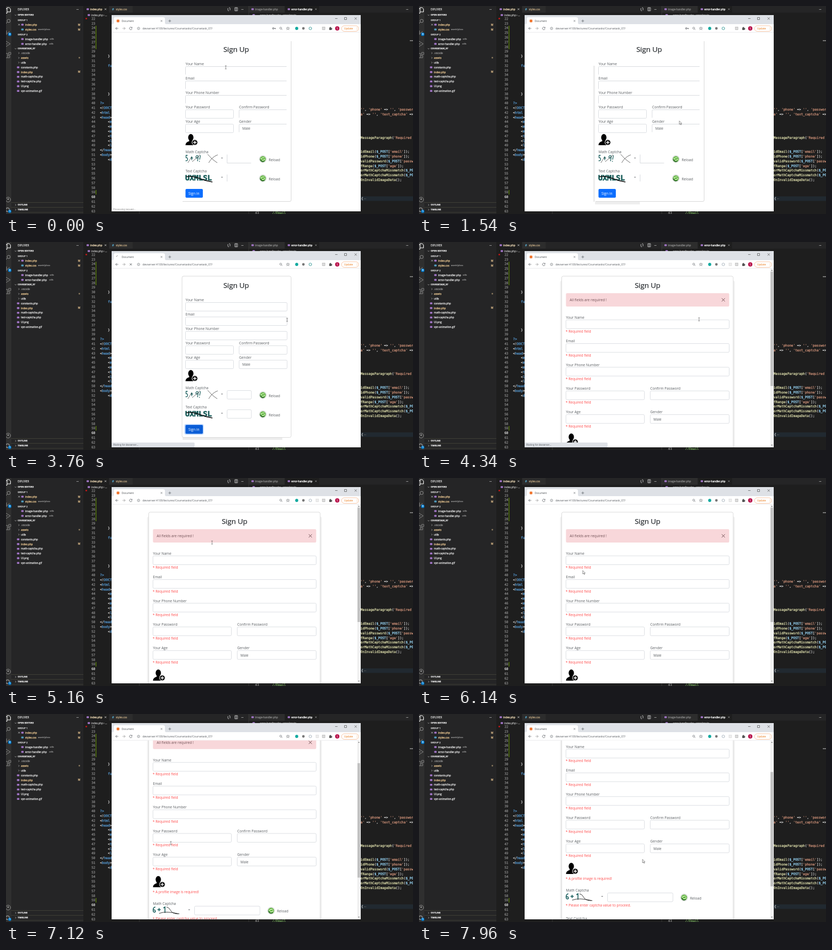
Animation of 763x390 px, one loop 8 s. Source, as an HTML page:

```html
<!DOCTYPE html>
<html lang="en">
<head>
<meta charset="utf-8">
<title>Sign Up</title>
<style>
html, body { margin: 0; width: 100%; height: 100%; overflow: hidden; background: #1e1e1e; }
svg { display: block; width: 100%; height: 100%; }
text { font-family: "Open Sans", "Noto Sans", sans-serif; white-space: pre; stroke-width: 0; }
.code { font-family: "DejaVu Sans Mono", "Noto Sans Mono", monospace; }
.strong text { stroke-width: 0.25px; }
.heavy { stroke-width: 0.7px; }
</style>
</head>
<body>
<svg id="stage" viewBox="0 0 763 390"></svg>
<script>
const LOOP = 8000, STEP = 139.7, LAG = 25;
const CHAR = 3.68, LINE = 8.8;

// Markup helpers; text is placed by its vertical middle.
const esc = s => s.replace(/&/g, '&amp;').replace(/</g, '&lt;');
const text = (x, y, s, size, fill, extra = '') =>
  `<text x="${x}" y="${y + size * 0.35}" font-size="${size}" fill="${fill}" stroke="${fill}" ${extra}>${esc(s)}</text>`;
const rect = (x, y, w, h, fill, extra = '') =>
  `<rect x="${x}" y="${y}" width="${w}" height="${h}" fill="${fill}" ${extra}/>`;
const dot = (x, y, r, fill, extra = '') => `<circle cx="${x}" cy="${y}" r="${r}" fill="${fill}" ${extra}/>`;
const line = (d, stroke, w = 0.7, extra = '') =>
  `<path d="${d}" fill="none" stroke="${stroke}" stroke-width="${w}" ${extra}/>`;
const group = (id, body, extra = '') => `<g id="${id}" ${extra}>${body}</g>`;
const cross = (x, y, r, color, w) => line(`M${x - r} ${y - r}l${2 * r} ${2 * r}m0 ${-2 * r}l${-2 * r} ${2 * r}`, color, w);
const fileIcon = (x, y, color = '#a074c4') => rect(x, y - 1.8, 4.6, 3.6, color, 'rx="1.2"');

function code(x, y, s) {
  const tokens = s.match(/'[^']*'?|\/\/.*|\$\w+|<\/?|\w+|[^\w'$<\/]+|./g);
  let html = '';
  tokens.forEach((t, i) => {
    const next = tokens[i + 1] || '';
    const color = t[0] === "'" ? '#ce9178'
      : t.startsWith('//') ? '#6a9955'
      : t[0] === '$' ? '#9cdcfe'
      : /^\w/.test(t) ? (next[0] === '(' ? '#dcdcaa' : '#569cd6')
      : t[0] === '?' ? '#569cd6' : '#d4d4d4';
    html += `<tspan fill="${color}" stroke="${color}">${esc(t)}</tspan>`;
  });
  return `<text class="code" x="${x}" y="${y + 2.1}" font-size="6.1">${html}</text>`;
}

function activityBar() {
  const gray = '#8f8f8f';
  return rect(0, 0, 10, 390, '#2f2f2f')
    + line('M-1 5H2V3H6L8.5 5.5V11H2V5M2 11V13.5H-1', '#fff', 1)
    + line('M-1 34L2.5 30', gray, 1) + dot(5, 28, 3, 'none', `stroke="${gray}"`)
    + line('M1 46V54M1 51Q6 51 6 47', gray, 0.9) + dot(7, 53, 3.2, '#007acc') + text(6, 53, '3', 4, '#fff')
    + line('M0 66L8 71L0 76M0 71H3', gray, 0.9)
    + line('M-1 89H3V97H-1M3 93H7V97H3M5 87H9V91H5Z', gray, 0.9)
    + dot(4, 363, 4.5, 'none', `stroke="${gray}"`) + dot(4, 362, 1.6, gray)
    + dot(3, 382, 3.5, 'none', `stroke="${gray}" stroke-width="1.5"`)
    + dot(7, 385, 3, '#007acc') + text(5.9, 385, '1', 4, '#fff');
}

function fileRow(x, y, name, opt = {}) {
  const color = opt.color || '#dcdcdc';
  return fileIcon(x - 7.5, y, opt.icon)
    + text(x, y, name, 4.8, color)
    + (opt.dir ? text(opt.dirX, y, opt.dir, 3.9, '#8a8a8a') : '')
    + (opt.mark ? text(135, y, opt.mark, 4.7, color) : '');
}

function sidebar() {
  const yellow = '#e2c08d', rule = '#46463a';
  const head = (x, y, s) => text(x, y, s, 4.15, '#e4e4e4', 'font-weight="700"');
  const chevron = (x, y, open) =>
    line(open ? `M${x - 1.5} ${y - 0.7}l1.5 1.5l1.5 -1.5` : `M${x - 0.7} ${y - 1.5}l1.5 1.5l-1.5 1.5`, '#ccc', 0.7);
  let s = rect(10, 0, 135, 390, '#252526')
    + text(22, 6, 'EXPLORER', 4.4, '#c4c4c4') + text(132, 6, '···', 5, '#ccc', 'font-weight="700"')
    + chevron(18, 17, true) + head(22, 17, 'OPEN EDITORS')
    + text(22, 26, 'GROUP 1', 4.3, '#dcdcdc') + cross(24.5, 35, 1.5, '#ccc', 0.8)
    + fileRow(36, 35, 'index.php', { color: yellow, mark: 'M' })
    + fileRow(36, 44, 'styles.css', { color: yellow, mark: 'M', icon: '#519aba', dir: 'assets\\js\\css', dirX: 60 })
    + text(22, 53, 'GROUP 2', 4.3, '#dcdcdc')
    + fileRow(36, 62, 'image-handler.php', { dir: 'utils', dirX: 82 })
    + fileRow(36, 71, 'error-handler.php', { dir: 'utils', dirX: 81 })
    + chevron(18, 80, true) + head(22, 80, 'COURSETASK_07');
  [['.vscode', '#8a8a8a'], ['assets', yellow], ['utils', '#dcdcdc']].forEach(([name, color], i) => {
    const y = 88.3 + i * 8.9;
    s += chevron(24, y, false) + text(28, y, name, 4.8, color);
  });
  s += dot(137.5, 97, 1.4, '#8f7e61');
  ['constants.php', 'index.php', 'math-captcha.php', 'text-captcha.php', 'UI.png', 'vpn-animation.gif']
    .forEach((name, i) => {
      s += fileRow(28, 115 + i * 8.85, name, i === 1 ? { color: yellow, mark: 'M' } : {});
    });
  ['OUTLINE', 'TIMELINE'].forEach((name, i) => {
    const y = 373 + i * 9;
    s += line(`M10 ${y - 4.5}H145`, rule, 0.8) + chevron(18, y, false) + head(22, y, name);
  });
  return s + line('M10 387H145', rule, 0.8);
}

function editors() {
  let s = rect(145, 0, 618, 390, '#1e1e1e') + rect(145, 0, 618, 12.5, '#252526')
    + rect(145, 0, 48, 12.5, '#1e1e1e') + rect(193.5, 0, 44, 12.5, '#2d2d2d')
    + rect(455, 0, 67, 12.5, '#2d2d2d') + rect(523, 0, 64, 12.5, '#1e1e1e')
    + fileIcon(151, 6) + text(158, 6, 'index.php', 4.85, '#f0dcb8') + cross(186.5, 6, 1.5, '#ddd', 0.8)
    + text(199, 6, '#', 5, '#519aba', 'font-weight="700"') + text(206, 6, 'styles.css', 4.8, '#b39c7a')
    + fileIcon(460, 6) + text(467, 6, 'image-handler.php', 4.8, '#858585')
    + fileIcon(528, 6) + text(535, 6, 'error-handler.php', 4.7, '#fff') + cross(581, 6, 1.5, '#999', 0.7)
    + fileIcon(153, 17) + text(160, 17, 'index.php › ...', 4.7, '#a9a9a9')
    + fileIcon(462, 17) + text(476, 17, 'error-handler.php › errorInputs', 4.7, '#999')
    + line('M416 4V8Q416 9 418 9M420 8V4Q420 3 418 3M429 3H434V9H429ZM431.5 3V9', '#ccc', 0.9)
    + text(441, 6, '···', 5, '#ccc', 'font-weight="700"') + text(750, 6, '···', 5, '#ccc', 'font-weight="700"')
    + line('M455 0V390M250 385V390', '#444', 0.6)
    + dot(150.5, 23.5, 1.6, '#c01818')
    + rect(168, 37, 1.4, 44, '#587c0c') + rect(168, 345, 1.4, 8.5, '#587c0c');

  const left = { 30: '    }', 32: '    fu', 38: '    }', 40: '?>', 41: '<!DOCT', 42: '<html', 43: '<head>',
    44: '    <m', 45: '    <m', 46: '    <m', 47: '    <t', 48: '    <l', 49: '    <l', 50: '</head>', 51: '<body>', 52: '    <d' };
  for (let n = 22; n <= 63; n++) {
    const y = 23.6 + (n - 22) * LINE;
    s += text(167.5, y, String(n), 6.1, n === 60 ? '#d6d6d6' : '#858585', 'class="code" text-anchor="end"');
    if (left[n]) s += code(176.3, y, left[n]);
  }

  const right = [
    [194, "'', 'phone' => '', 'password'"], [202.8, "'ta' => '', 'text_captcha' =>", 2],
    [246.5, "MessageParagraph('Required fi"], [273, "idEmail($_POST['email']);"], [281.8, "idPhone($_POST['phone']);"],
    [290.6, "validPassword($_POST['password"], [299.4, "fRange($_POST['age']);"],
    [308.2, "orMathCaptchaMissmatch($_POST"], [317, "orMathCaptchaMissmatch($_POST"], [325.8, 'OnInvalidImageData();']
  ];
  s += rect(455, 357, 308, 8.5, '#212930');
  for (const [y, row, cut = 0] of right) s += code(664.8 - cut * CHAR, y, row);
  return s + code(666, 361, '{') + text(671, 361, '···', 5, '#888') + line('M757 65H763', '#ccc', 1)
    + text(467, 387.5, '43', 6.1, '#858585', 'class="code"') + code(499, 387.5, '//Email');
}

function browserChrome() {
  const g = '#5f6368';
  return rect(198, 17, 467, 368, '#fff') + rect(198, 17, 467, 17, '#dee1e6')
    + '<path d="M199 34.5Q202 34 202 31V24Q202 21 205 21H294Q298 21 298 24V31Q298 34 301 34.5Z" fill="#fff"/>'
    + group('favicon', rect(207.5, 25.5, 5, 5, '#f0742c', 'rx="1"'))
    + group('spinner', line('M207 28A2.5 2.5 0 0 1 209.5 25.5', '#888', 0.8))
    + text(217, 28, 'Document', 4.6, '#45494d') + cross(291.5, 28, 1.5, g, 0.7)
    + line('M304.5 28H309.5M307 25.5V30.5', g, 0.8)
    + line('M617 23.5H621.5M634.5 21.5H638.5V25.5H634.5Z', '#333', 0.6) + cross(655.5, 23.5, 2, '#333', 0.6)
    + line('M210.5 42H205.5M208 39.5L205.5 42L208 44.5', g, 0.8)
    + line('M218.5 42H223.5M221 39.5L223.5 42L221 44.5', '#999', 0.8)
    + group('reload', line('M235.6 40.2A2.5 2.5 0 1 0 236.3 42.8M236.3 39.3V41.3H234.3', g, 0.8))
    + group('halt', cross(234, 42, 2, g, 0.8))
    + dot(248.5, 42, 2.3, 'none', `stroke="${g}" stroke-width=".6"`) + line('M248.5 41.5V43.3M248.5 40.5V41', g, 0.6)
    + text(256, 42, 'devserver:4100/lectures/Coursetasks/Coursetask_07/', 5.3, '#55595e')
    + group('key', dot(501, 42, 1.4, 'none', `stroke="${g}" stroke-width=".9"`) + line('M502.5 42H506M505 42V43.3', g, 0.9))
    + dot(515, 41.5, 1.8, 'none', `stroke="${g}" stroke-width=".7"`) + line('M516.4 42.9L518 44.5', g, 0.8)
    + line('M528.5 39L529.3 41.2H531.5L529.8 42.5L530.4 44.7L528.5 43.4L526.6 44.7L527.2 42.5L525.5 41.2H527.7Z', g, 0.6)
    + dot(545, 42, 2.9, '#14aaa0') + dot(557.5, 42, 2.4, '#777')
    + group('extA', dot(570.5, 42, 2.5, '#fff', 'stroke="#3c9c9a"'))
    + group('extB', dot(570.5, 42, 2.5, '#fff', 'stroke="#a9b4bd"') + rect(581, 39.5, 5, 5, '#eee', 'stroke="#ccc" stroke-width=".5"'))
    + rect(593, 39.5, 5, 5, '#ddd', 'stroke="#999" stroke-width=".5"')
    + rect(606, 40.5, 4.5, 4.5, '#555', 'rx=".6"') + dot(608, 40.3, 1.1, '#555') + dot(610.7, 42.7, 1, '#555')
    + dot(621, 42, 4, '#b8124b') + text(621, 42, 'S', 4.5, '#fff', 'text-anchor="middle"')
    + rect(629, 37, 32, 10.5, '#fff', 'rx="5.2" stroke="#f5b183" stroke-width=".7"')
    + text(634, 42.2, 'Update', 4.7, '#e8710a') + text(655, 42, '⋮', 6, '#e8710a')
    + line('M198 49.3H665', '#dadce0', 0.6);
}

const label = (x, y, s) => text(x, y + 0.4, s, 6.65, '#5b5f63');
const title = (x, y) => `<g class="strong">${text(x, y, 'Sign Up', 13.5, '#2a2e32', 'text-anchor="middle"')}</g>`;
const warn = (y, s) => text(275, y, s, 6.5, '#ff4a4a');
const field = (x, y, w, h = 16.5) => rect(x, y, w, h, '#fff', 'rx="2" stroke="#d3d7dc" stroke-width=".8"');
const partField = (x, y, w) => line(`M${x + w} ${y}H${x + 2}Q${x} ${y} ${x} ${y + 2}V${y + 15}`, '#d0d4d9', 0.8);
const person = (x, y) => `<g transform="translate(${x} ${y})"><ellipse cx="10" cy="6.5" rx="5" ry="6.5"/>`
  + '<path d="M0 21Q0 15.5 7 13.5V10H13V13.5Q20 15.5 20 21Z"/>'
  + dot(17.5, 15.8, 5.3, '#111', 'stroke="#fff"') + line('M14.5 15.8H20.5M17.5 12.8V18.8', '#fff', 1.4) + '</g>';
const refresh = (x, y) => dot(x, y, 6.5, '#dde3dc', 'stroke="#b4bdb6" stroke-width=".6"') + dot(x, y, 5.3, '#5cb53a')
  + line(`M${x - 4.6} ${y}A4.6 4.6 0 0 0 ${x + 3} ${y + 3.5}`, '#2c6b28', 1.6)
  + line(`M${x - 4} ${y + 0.5}Q${x - 1} ${y - 4} ${x + 3} ${y - 2}M${x + 4} ${y}Q${x + 1} ${y + 3.5} ${x - 2} ${y + 1.5}`, '#e0f4cf', 1.4)
  + label(x + 11, y + 0.8, 'Reload');

function smallForm() {
  const names = ['Your Name', 'Email', 'Your Phone Number', 'Your Password', 'Your Age'];
  const teal = '#1b5f5e';
  let part = '', full = '', labels = '';
  names.forEach((name, i) => {
    const y = 108 + i * 27, top = y + 5.5;
    labels += label(336.5, y, name);
    if (i < 3) {
      part += partField(336.5, top, 189.5);
      full += field(336.5, top, 190.5, 16);
    } else {
      part += field(336.5, top, 90, 16) + partField(437, top, 89);
      full += field(336.5, top, 90, 16) + field(437, top, 90, 16);
    }
  });
  part += line('M414.5 278.5V294.5H459.5M414.5 316V329', '#d0d4d9', 0.8);
  full += field(414.5, 278.5, 45.5, 16) + field(414.5, 314.5, 45.5, 16);
  return group('cardPart', line('M534.5 66V364Q534.5 366.5 532 366.5H331', '#cfcfcf', 0.8) + part)
    + group('shade', rect(326.5, 112, 3.5, 255, '#eee') + rect(330, 367, 84, 5, '#eee'))
    + group('cardFull', rect(331, 366, 187, 5, '#ececec')
      + rect(330, 64, 204.5, 302.5, '#fff', 'rx="3" stroke="#d2d2d2" stroke-width=".8"') + full)
    + title(431.5, 81.6) + labels
    + label(437, 189, 'Confirm Password') + label(437, 216, 'Gender') + label(443, 229.6, 'Male')
    + person(336.5, 240) + label(336.5, 273, 'Math Captcha') + label(336.5, 309, 'Text Captcha')
    + label(403, 284, '=') + label(403, 320, '=') + refresh(481.5, 287) + refresh(481.5, 323)
    + line('M340.5 280H337.5V284.5Q340.500 284 340.5 287.500Q340 291 336.500 290M346 285H350.5M348.3 282V289', teal, 1.3)
    + line('M360 284Q356 287 356 282.500Q358 278.500 360.500 282L359 291M364.5 280L363 288M362.6 290.5V292', teal, 1.3)
    + line('M341 294L348 283M349 292L364 279M378 278Q386 288 396 294M380 294Q386 283 397 279', '#333', 0.7)
    + text(336, 322.3, 'UXMLSL', 13.8, '#1c5f5c', 'class="code heavy" font-weight="700"')
    + line('M338 320Q350 318 362 323T387 330', '#111', 1.5)
    + group('focusRing', rect(334.5, 341.5, 36, 19.5, '#b6d4fe', 'rx="3"'))
    + '<rect id="button" x="336.5" y="343" width="32.5" height="16.5" rx="2"/>'
    + text(342, 351.3, 'Sign in', 6.65, '#fff');
}

function wideForm() {
  let s = rect(264.5, 72, 327.5, 500, '#f1f1f1', 'rx="4"')
    + rect(267.5, 64, 321.5, 500, '#fff', 'rx="3" stroke="#d2d2d2" stroke-width=".8"')
    + title(428.5, 81.6)
    + rect(275.5, 96, 306, 25, '#f8d7da', 'rx="2"') + text(282.5, 109, 'All fields are required !', 6.65, '#705055')
    + cross(570.5, 108.5, 2.9, '#6a484c', 1);
  ['Your Name', 'Email', 'Your Phone Number', 'Your Password', 'Your Age'].forEach((name, i) => {
    const y = 141 + i * 44.4, half = i > 2;
    s += label(275.5, y, name) + field(275.5, y + 5, half ? 147 : 306)
      + (half ? field(433.5, y + 5, 148) : '') + warn(y + 27, '* Required field');
  });
  return s + label(433.5, 274.2, 'Confirm Password') + label(433.5, 318.6, 'Gender') + label(439.5, 332, 'Male')
    + person(275.5, 359) + warn(389, '* A profile image is required!')
    + label(275.5, 410, 'Math Captcha') + label(341.5, 421, '=') + field(353.5, 415.5, 122.5)
    + refresh(497, 424) + warn(439, '* Please enter captcha value to proceed.') + label(275.5, 463, 'Text Captcha')
    + line('M280 417Q275 418 276 425Q277 428 280 426Q280 421 276 423M284 422H290M287 419V425M295 419L298 417V428', '#1b5f5e', 1.6)
    + line('M287 429Q300 424 325 430M301 417Q306 418 309 424T323 430', '#222', 0.9);
}

document.getElementById('stage').innerHTML =
  '<clipPath id="view"><rect x="198" y="49.5" width="467" height="335.5"/></clipPath>'
  + `<g class="strong">${editors()}${sidebar()}${activityBar()}</g>` + browserChrome()
  + '<g clip-path="url(#view)">' + group('small', smallForm()) + group('wide', wideForm())
  + group('bar', rect(658.5, 49.5, 6, 336, '#f1f1f1')
    + '<path d="M660 54L661.5 52L663 54ZM660 380L661.5 382L663 380Z" fill="#777"/>'
    + '<rect id="thumb" x="659" y="55.5" width="5" height="214.5" fill="#c1c1c1"/>')
  + group('processing', text(201, 381, 'Processing request...', 4.4, '#8a8a8a'))
  + group('waiting', rect(198, 376, 155.5, 10, '#dee1e6', 'rx="1.5"') + text(201, 380.8, 'Waiting for devserver...', 4.4, '#5f6368'))
  + '</g>'
  + group('arrow', '<path d="M0 0V6.5L1.6 5L2.8 7.4L3.8 7L2.7 4.7H4.7Z" fill="#fff" stroke="#444" stroke-width=".6"/>')
  + group('beam', line('M-1.5 -3H1.5M0 -3V3M-1.5 3H1.5', '#666', 0.7));

const $ = id => document.getElementById(id);
const show = (id, on) => $(id).setAttribute('display', on ? 'inline' : 'none');

// step, x, y, text cursor
const MOUSE = [
  [0, 412, 115, 1], [3, 437, 118, 1], [4, 437, 118, 1], [7, 365, 118, 1], [8, 344, 135, 0],
  [11, 490, 219, 0], [12, 387, 261, 0], [17, 352, 354, 0], [24, 352, 354, 0], [27, 527, 146, 1],
  [31, 525, 145, 1], [39, 340, 113, 1], [40, 348, 113, 1], [42, 541, 125, 0], [44, 309, 177, 0],
  [47, 309, 204, 0], [51, 309, 242, 1], [55, 328, 248, 0], [57, 421, 276, 0]
];
const SCROLL = [[0, 0], [47, 0], [51, 55.2], [54, 80], [57, 80]];

function at(keys, n) {
  let i = keys.length - 1;
  while (keys[i][0] > n) i--;
  const a = keys[i], b = keys[i + 1] || a;
  const k = b === a ? 0 : (n - a[0]) / (b[0] - a[0]);
  return { values: a.slice(1).map((v, j) => v + (b[j + 1] - v) * k), key: a };
}

function draw(t) {
  const n = Math.min(57, Math.floor((t + LAG) / STEP));
  const loading = n >= 24 && n < 30, loaded = n >= 30;
  show('small', !loaded);
  show('wide', loaded);
  show('bar', loaded);
  show('cardPart', n < 24);
  show('shade', n >= 5 && n < 24);
  show('cardFull', loading);
  show('focusRing', loading);
  show('spinner', loading);
  show('halt', loading);
  show('favicon', !loading);
  show('reload', !loading);
  show('key', n < 24);
  show('extA', n < 30);
  show('extB', loaded);
  show('processing', n < 1);
  show('waiting', n >= 24 && n < 32);
  $('button').setAttribute('fill', n >= 16 ? '#0b5ed7' : '#0d6efd');

  const y = at(SCROLL, n).values[0];
  $('wide').setAttribute('transform', `translate(0 ${-y})`);
  $('thumb').setAttribute('transform', `translate(0 ${y * 0.665})`);

  const { values: [mx, my], key } = at(MOUSE, n);
  show('beam', key[3]);
  show('arrow', !key[3]);
  $('beam').setAttribute('transform', `translate(${mx} ${my})`);
  $('arrow').setAttribute('transform', `translate(${mx - 2} ${my - 3.5})`);
}

const start = performance.now();
function tick() {
  draw((performance.now() - start) % LOOP);
  requestAnimationFrame(tick);
}
tick();
</script>
</body>
</html>
```
